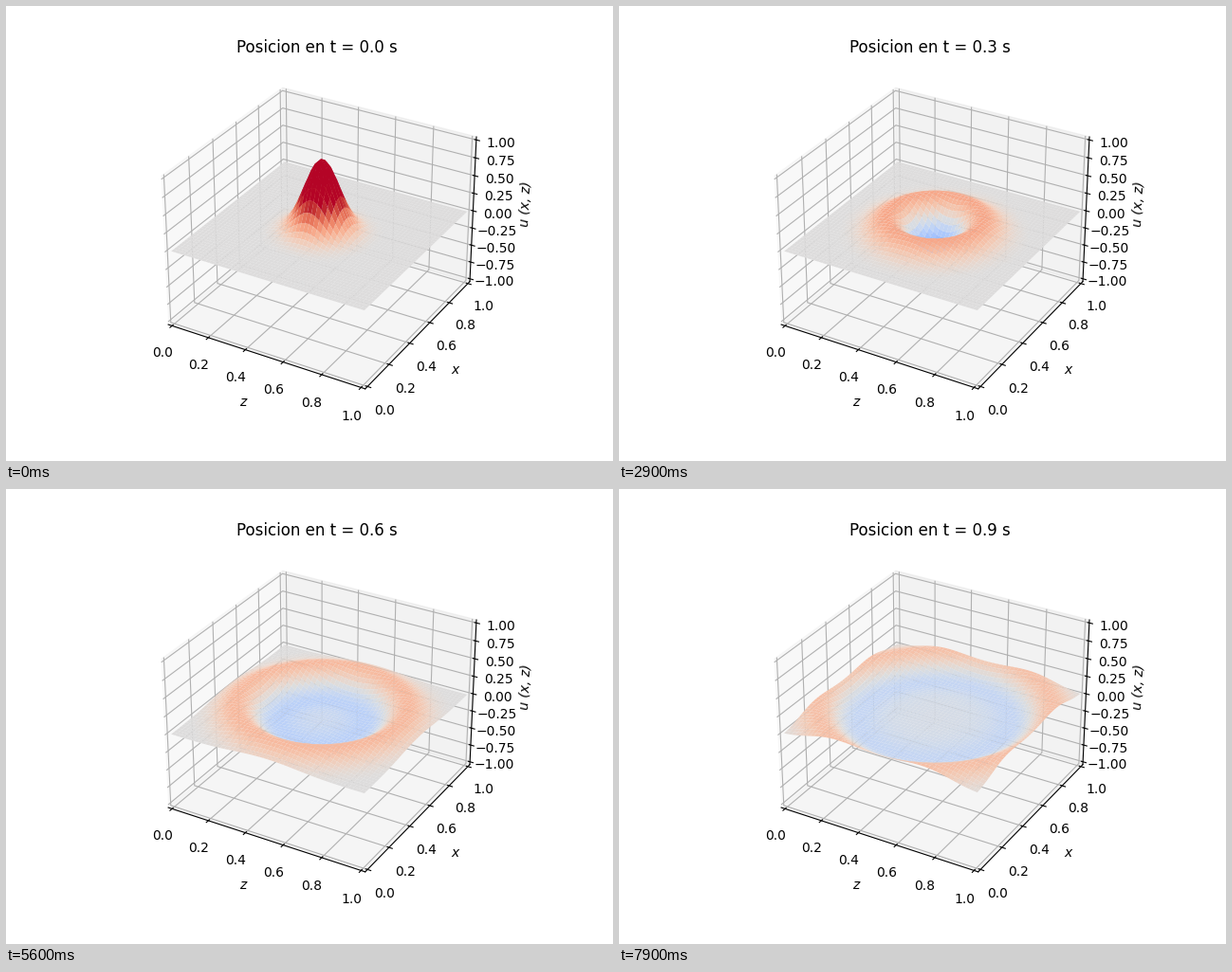
A matplotlib script that plays this animation: 640 px wide and 480 px high, repeating every 8000 ms.

```python
import numpy as np
import matplotlib.pyplot as plt
from matplotlib.animation import FuncAnimation

FRAMES = 80
INTERVAL = 100      # ms
DT = 1 / 90         # simulated seconds per frame
SPEED = 0.57
SIGMA = 0.0833      # width of the initial bump
N = 50

axis = np.linspace(0, 1, N)
Z, X = np.meshgrid(axis, axis)
R = np.hypot(Z - 0.5, X - 0.5)

# Hankel transform of a Gaussian bump spreading freely in the plane
k = (np.arange(240) + 0.5) * 0.028
weight = k * np.exp(-k**2 / 2) * 0.028
radii = np.linspace(0, 0.75, 240)
theta = np.arange(80) * np.pi / 80
phase = np.outer(radii / SIGMA, k)
J0 = sum(np.cos(phase * np.sin(a)) for a in theta) / len(theta)


def height(t):
    profile = J0 @ (weight * np.cos(k * SPEED * t / SIGMA))
    return np.interp(R, radii, profile)


def quads(u):
    pts = np.stack([Z, X, u], axis=-1)
    corners = [pts[:-1, :-1], pts[:-1, 1:], pts[1:, 1:], pts[1:, :-1]]
    return np.stack(corners, axis=2).reshape(-1, 4, 3)


fig = plt.figure(figsize=(6.4, 4.8), dpi=100)
ax = fig.add_subplot(projection="3d")
surface = ax.plot_surface(Z, X, height(0), cmap="coolwarm",
                          vmin=-0.5, vmax=0.5)

pad = 1 / 48
ax.set_xlim(-pad, 1 + pad)
ax.set_ylim(-pad, 1 + pad)
ax.set_zlim(-1 - 2 * pad, 1 + 2 * pad)
ax.set_xlabel("z", style="italic")
ax.set_ylabel("x", style="italic")
ax.set_zlabel("u (x, z)", style="italic")
title = ax.set_title("")


def update(i):
    t = i * DT
    faces = quads(height(t))
    surface.set_verts(faces)
    surface.set_array(faces[:, :, 2].mean(axis=1))
    title.set_text(f"Posicion en t = {t:.1f} s")
    return surface, title


anim = FuncAnimation(fig, update, frames=FRAMES, interval=INTERVAL,
                     repeat=True, repeat_delay=0, blit=False)
plt.show()
```
